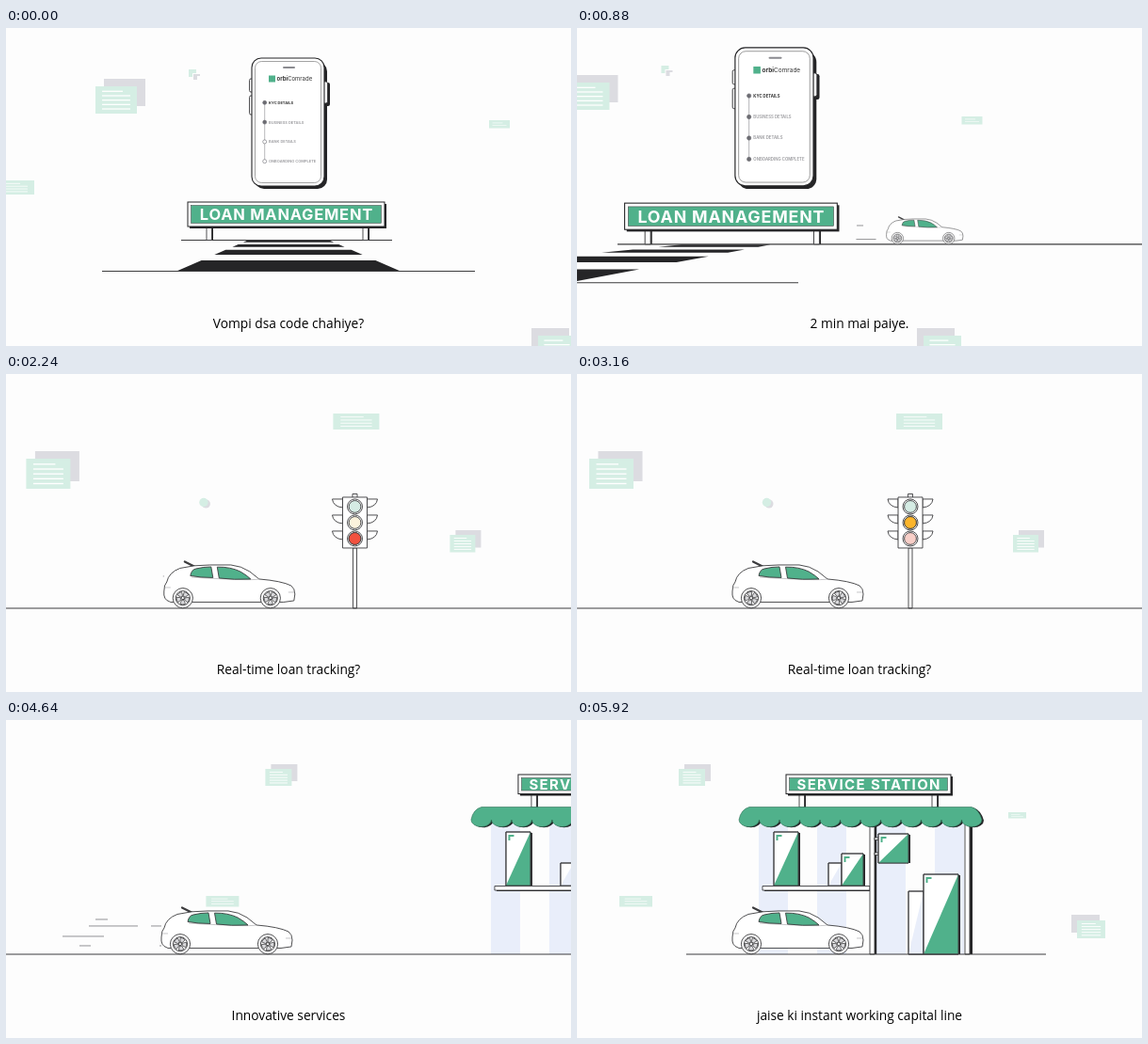
Write an HTML page that moves like this. It is 600 px wide and 338 px high and loops after 5.96 s.

```html
<!DOCTYPE html>
<html lang="en">
<head>
<meta charset="utf-8">
<title>Loan journey</title>
<style>
  html, body { margin: 0; width: 100%; height: 100%; overflow: hidden; background: #fdfdfd; }
  svg { display: block; width: 600px; height: 338px; }
  .ink { stroke: #3c3c3e; stroke-width: .9; stroke-linejoin: round; }
  .sign { font: 700 16.5px Inter, sans-serif; fill: #fff; text-anchor: middle; }
  .tiny { font: 600 4px Inter, sans-serif; fill: #98989c; }
  .brand { font: 400 6px Inter, sans-serif; fill: #333; }
  #caption { font: 400 13.75px "Open Sans", "Noto Sans", sans-serif; text-anchor: middle; }
</style>
</head>
<body>
<svg id="stage" viewBox="0 0 600 338"></svg>
<script>
const LOOP = 5960, STEP = 40, PAN = 1290;
const GREEN = '#50b18b', MINT = '#d5eee4', GREY = '#dcdce1', LILAC = '#e9eefa', DARK = '#252527';

// Shape helpers
const rect = (x, y, w, h, fill, more = '') =>
  `<rect x="${x}" y="${y}" width="${w}" height="${h}" fill="${fill}" ${more}/>`;
const path = (d, fill, more = '') => `<path d="${d}" fill="${fill}" ${more}/>`;
const circle = (x, y, r, fill, more = '') =>
  `<circle cx="${x}" cy="${y}" r="${r}" fill="${fill}" ${more}/>`;
const group = (id, body) => `<g id="${id}">${body}</g>`;
const INK = 'class="ink"';

// Floating document cards
function card(x, y, w, h, rows = 5) {
  let out = rect(x, y, w, h, MINT);
  for (let i = 0; i < rows; i++) {
    const len = w * (i ? .68 : .5);
    out += rect(x + w * .16, y + h * (i + 1) / (rows + 1.2), len, h * .035 + .25, '#fff');
  }
  return out;
}
const pair = (x, y, w, h, dx, dy) => rect(x + dx, y + dy, w, h, GREY) + card(x, y, w, h);

const docsA =
  pair(95, 62, 44, 29, 9, -8) +
  path('M194 44h8v4h-4v4h-4z', MINT) + path('M199 49h7v2h-3v4h-4z', GREY) +
  card(513, 98, 22, 8.5, 2) + card(-14, 162, 44, 15, 4);
const docsB =
  pair(13, 90, 47, 32, 9.5, -8) + card(339, 42, 49, 17, 4) +
  circle(204, 138, 4.5, GREY) + circle(201.5, 136.5, 4.7, MINT) +
  pair(463, 171, 27, 18.5, 6, -5);
const docsC =
  pair(108, 52, 28, 18, 6, -5) + card(458, 98, 19, 6.5, 2) +
  card(45, 187, 35, 11.5, 3) + pair(531, 213, 30, 19, -6, -6);

function phone() {
  const labels = ['KYC DETAILS', 'BUSINESS DETAILS', 'BANK DETAILS', 'ONBOARDING COMPLETE'];
  let out = rect(264, 36, 77, 135, DARK, 'rx="10"') +
    rect(337, 58, 7, 25, DARK, 'rx="2"') +
    rect(336, 57, 5.5, 23, '#fff', INK + ' rx="2"') +
    rect(258.5, 54, 5, 14, '#fff', INK + ' rx="1.5"') +
    rect(258.5, 72, 5, 20, '#fff', INK + ' rx="1.5"') +
    rect(261, 32, 77, 136, '#fff', `rx="10" stroke="${DARK}" stroke-width="1.1"`) +
    rect(264.5, 35.5, 70, 129, '#fff', 'rx="7" stroke="#666" stroke-width=".6"') +
    rect(294, 41, 13, 2, '#8b8b90', 'rx="1"') +
    rect(279, 50.5, 7, 7, GREEN) +
    '<text class="brand" x="287.5" y="56"><tspan font-weight="700">orbi</tspan>Comrade</text>' +
    path('M274.7 79V141.5', 'none', 'stroke="#8b8b90" stroke-width=".6"');
  labels.forEach((label, i) => {
    const y = 79.3 + i * 20.8;
    out += circle(274.7, y, 2, i < 2 ? '#6c6c72' : '#fff', `id="dot${i}" stroke="#6c6c72" stroke-width=".6"`) +
      `<text class="tiny" x="279" y="${y + 1.4}" ${i ? '' : 'style="fill:#333;font-weight:700"'}>${label}</text>`;
  });
  return out;
}

function board(x, y, w, h, label, size, gap) {
  return rect(x + 2, y + 2, w, h, DARK) +
    rect(x, y, w, h, '#fff', `stroke="${DARK}"`) +
    rect(x + 3.5, y + 3.5, w - 7, h - 7, GREEN, 'stroke="#3c3c3e" stroke-width=".5"') +
    `<text class="sign" x="${x + w / 2 + gap / 2}" y="${y + h / 2 + size * .363}" ` +
    `style="font-size:${size}px;letter-spacing:${gap}px">${label}</text>`;
}
const leg = (x, y, h) => rect(x + 2, y, 5, h, DARK) + rect(x, y, 5.5, h, '#fff', INK);

const loanSign = leg(213, 211, 14.5) + leg(379, 211, 14.5) +
  board(193, 185, 209, 26, 'LOAN MANAGEMENT', 16.5, .75);

function trafficLight() {
  let out = rect(-2, -64, 4, 64, '#fff', INK) + rect(-2.5, -121.5, 5, 4, '#fff', INK);
  for (const y of [-116, -99, -82])
    for (const s of [-1, 1])
      out += path(`M${13 * s} ${y}H${24 * s}Q${23 * s} ${y + 8} ${13 * s} ${y + 9}z`, '#fff', INK);
  out += rect(-13, -118, 26, 54, '#fff', INK);
  [['#d5ece4', GREEN], ['#fcf3dc', '#fbb52c'], ['#f8cfc8', '#f2513f']].forEach(([dim, lit], i) => {
    const y = -108 + i * 17;
    out += circle(0, y, 8, '#fff', INK) + circle(0, y, 6.4, dim, INK) +
      circle(0, y, 6.4, lit, `${INK} id="lamp${i}"`);
  });
  return out;
}

function wheel(x, id) {
  let spokes = '';
  for (let i = 0; i < 5; i++)
    spokes += path('M-1.2 -2.2L-2.8 -6.2A6.8 6.8 0 0 1 2.8 -6.2L1.2 -2.2z', '#d9d9dc',
      `transform="rotate(${i * 72})" stroke="#3c3c3e" stroke-width=".7"`);
  return `<g transform="translate(${x} -10.8)">` + circle(0, 0, 10.6, '#fff', INK) +
    circle(0, 0, 7.6, '#fff', INK) + group(id, spokes + circle(0, 0, 1.6, '#fff', INK)) + '</g>';
}
const car =
  path('M-47 -49.5L-37 -44.5', 'none', 'stroke="#3c3c3e" stroke-width="2.2" stroke-linecap="round"') +
  path('M-63 -7Q-70 -9 -69 -18Q-69 -25 -66 -28Q-64 -38 -52 -42.5Q-38 -46 -20 -46H2' +
    'Q13 -45 22 -39L32 -31Q56 -29 66 -24Q70 -21 70 -15L69 -8L58 -6.5H-62z', '#fff', INK) +
  path('M32 -31Q24 -29 -40 -33M-69 -22H-62M70 -17H63', 'none', 'stroke="#8d8d90" stroke-width=".5"') +
  path('M-41 -34.5Q-40 -41 -35 -42Q-27 -44 -19 -44L-17 -32.5Q-30 -32.5 -41 -34.5z', GREEN, INK) +
  path('M-12.5 -43.8Q2 -44 12 -39Q19 -35 23 -31Q5 -30 -10.5 -32z', GREEN, INK) +
  wheel(-49, 'wheelL') + wheel(44, 'wheelR');

// Box with a diagonal two-tone front
function pack(x, y, w, h, tone, shadow = 2) {
  return (shadow ? rect(x + shadow, y + 1, w, h - 1, DARK) : '') +
    rect(x, y, w, h, '#fff', INK) +
    path(`M${x + w} ${y}V${y + h}H${x}z`, tone) +
    (shadow ? path(`M${x + 2.5} ${y + 3}h6v2h-4v4h-2z`, GREEN) : '') +
    rect(x, y, w, h, 'none', INK);
}

function station() {
  let out = '';
  for (const x of [193, 255, 318, 380]) out += rect(x, 104, 31, 145, LILAC);
  out += pack(209, 119, 26, 57, GREEN) + pack(267, 152, 14, 24, LILAC, 0) + pack(281, 142, 23, 34, GREEN) +
    rect(199, 178, 112, 4, DARK) + rect(197, 176.5, 114, 4.5, '#fff', INK) +
    rect(315, 104, 3.2, 145, DARK) + rect(311, 104, 5, 145, '#fff', INK) +
    rect(416, 104, 4, 145, DARK) + rect(412, 104, 5, 145, '#fff', INK) +
    rect(316, 125, 5, 2.5, '#fff', INK) + rect(316, 141, 5, 2.5, '#fff', INK) +
    pack(320, 121, 32, 31, GREEN) +
    pack(352, 182, 16, 67, LILAC, 0) + pack(368, 164, 37, 85, GREEN) +
    leg(236, 79, 14) + leg(377, 79, 14);
  let edge = 'M183 92.5H419Q427 95 430 106';
  for (let i = 0; i < 12; i++) edge += 'a10.75 7.5 0 0 1 -21.5 0';
  edge += 'Q174 95 183 92.5z';
  return out + path(edge, DARK, 'transform="translate(2 .8)"') +
    path(edge, GREEN, 'stroke="#2f6f57" stroke-width=".6"') +
    board(222, 58, 175, 20.5, 'SERVICE STATION', 15, 1.35);
}

document.getElementById('stage').innerHTML =
  group('docsA', docsA) + group('docsLow', pair(565, 327, 40, 28, -7, -8)) +
  group('docsNear', rect(-233, 316, 48, 30, MINT)) +
  group('docsB', docsB) + group('docsC', docsC) +
  path('', DARK, 'id="zebra"') +
  group('phone', phone()) + group('station', station()) + group('light', trafficLight()) +
  path('', 'none', 'id="ground" stroke="#3c3c3e" stroke-width="1.1"') +
  group('loanSign', loanSign) +
  path('', 'none', 'id="streaks" stroke="#77777a" stroke-width=".8"') +
  group('car', car) + '<text id="caption" x="300" y="318.5"></text>';

const el = {};
document.querySelectorAll('[id]').forEach(n => el[n.id] = n);

// Smooth monotone curve through [time, value] points, flat at both ends
function track(...k) {
  const d = k.slice(1).map((p, i) => (p[1] - k[i][1]) / (p[0] - k[i][0]));
  const m = k.map((_, i) => {
    const a = d[i - 1] || 0, b = d[i] || 0;
    return a * b > 0 ? 2 * a * b / (a + b) : 0;
  });
  return t => {
    if (t <= k[0][0]) return k[0][1];
    const i = k.findIndex(p => p[0] >= t) - 1;
    if (i < 0) return k[k.length - 1][1];
    const h = k[i + 1][0] - k[i][0], u = (t - k[i][0]) / h, v = 1 - u;
    return v * v * (1 + 2 * u) * k[i][1] + u * u * (3 - 2 * u) * k[i + 1][1] +
      h * u * v * (v * m[i] - u * m[i + 1]);
  };
}
const ease = (t, a, b) => {
  const u = Math.min(1, Math.max(0, (t - a) / (b - a)));
  return u < .5 ? 2 * u * u : 1 - 2 * (1 - u) ** 2;
};

const panA = track([300, 0], [600, 35], [880, 134], [1240, 560], [1680, 1070], [2080, 1250], [2480, PAN]);
const panB = track([3460, 0], [3800, 32], [4120, 162], [4360, 480], [4560, 850],
  [4780, 1130], [5000, 1260], [5240, 1284], [5560, PAN]);
const carX = track([300, 690], [880, 369], [1680, 272.5], [2400, 234]);
const lineGrow = track([280, 410], [560, 600]);
const lineL = track([5020, 0], [5440, 72], [5800, 116]);
const lineR = track([5020, 600], [5440, 509], [5800, 498]);

const captions = [[0, 'Vompi dsa code chahiye?'], [640, '2 min mai paiye.'], [2080, 'Real-time loan tracking?'],
  [3400, 'Bilkul.'], [4520, 'Innovative services'], [5560, 'jaise ki instant working capital line']];

// Speed lines: [distance behind the car at the given time, height, length]
const runs = [
  { on: 640, off: 2280, at: 1680, rows: [[81, 34, 10], [34, 34, 12], [67, 18, 53], [75, 9, 25], [35, 9, 36]] },
  { on: 3920, off: 5360, at: 5000, rows: [[101, 30, 11], [50, 37, 13], [85, 19, 44], [57, 30, 52], [92, 9, 19], [67, 9, 12]] }
];
function streaks(t, left, floor, k) {
  const run = runs.find(r => t >= r.on && t < r.off);
  if (!run) return '';
  return run.rows.map(([gap, up, len]) => {
    const far = (((gap + (t - run.at) * .25) % 110) + 110) % 110;
    if (far > (t - run.on) * .25 || far > (run.off - t) * .5) return '';
    return `M${left - far * k} ${floor - up * k}h${Math.min(len, far) * k}`;
  }).join('');
}

function zebra(p, y) {
  const side = (dy, s) => {
    const v = dy * (1 + .24 * p);
    return `${300 - 139 * p - 7.6 * p * v + s * (43 + 3.5 * p + 2.3 * v)} ${y + v}`;
  };
  return [[.3, 2.3], [4.5, 7.2], [10.3, 15.5], [21.5, 33]].map(([a, b]) =>
    `M${side(a, -1)}L${side(a, 1)}L${side(b, 1)}L${side(b, -1)}z`).join('');
}

const place = (name, v) => el[name].setAttribute('transform', v);
const show = (name, on) => el[name].setAttribute('display', on ? 'inline' : 'none');

function draw(t) {
  const a = panA(t), b = panB(t), p = a / 134;
  const k = .49 + .51 * ease(t, 300, 2200);
  const floor = 225.5 + (k - .49) * 46;
  const grow = 1 + .08 * p, first = a < 700;

  // Opening scene
  show('phone', first);
  show('loanSign', first);
  place('phone', `translate(${300 - 90 * p ** 1.2} 170) scale(${grow}) translate(-300 -170)`);
  place('loanSign', `translate(${298 - a} ${floor}) scale(${grow}) translate(-298 -225.5)`);
  el.zebra.setAttribute('d', first ? zebra(p, floor) : '');
  el.dot2.setAttribute('fill', t < 200 ? '#fff' : '#6c6c72');
  el.dot3.setAttribute('fill', t < 480 ? '#fff' : '#6c6c72');

  // Cards drift at their own depth
  place('docsA', `translate(${-.78 * a} ${-4 * Math.min(p, 2)})`);
  place('docsLow', `translate(${-1.47 * a} 0)`);
  place('docsNear', `translate(${PAN - a} 0)`);
  place('docsB', `translate(${.51 * (PAN - a) - .7 * b} 0)`);
  place('docsC', `translate(${.52 * (PAN - b)} 0)`);
  show('docsC', b > 0);

  // Road
  const start = first ? 298 - a - 112 * grow : lineL(t);
  const end = t < 1000 ? lineGrow(t) : lineR(t);
  let road = `M${Math.max(0, start)} ${floor}H${end}`;
  if (first) road += `M${102 - 400 * p} ${floor + 33 * (1 + .24 * p)}H${498 - 263 * p}`;
  el.ground.setAttribute('d', road);

  // Traffic light
  place('light', `translate(${354 + PAN - a - b} ${floor}) scale(${k})`);
  const amber = ease(t, 2720, 2840), go = ease(t, 3360, 3480);
  [go, amber * (1 - go), 1 - amber].forEach((o, i) => el['lamp' + i].setAttribute('opacity', o));

  // Service station
  show('station', b > 600);
  place('station', `translate(${PAN - b} 0)`);

  // Car
  const x = carX(t), turn = (a + b) * 5.4 % 360;
  place('car', `translate(${x} ${floor}) scale(${k})`);
  place('wheelL', `rotate(${turn})`);
  place('wheelR', `rotate(${turn})`);
  el.streaks.setAttribute('d', streaks(t, x - 69 * k, floor, k));

  const text = captions.filter(c => c[0] <= t).pop()[1];
  if (el.caption.textContent !== text) el.caption.textContent = text;
}

const begin = performance.now();
function tick() {
  const t = (performance.now() - begin) % LOOP;
  draw(Math.floor(t / STEP) * STEP);
  requestAnimationFrame(tick);
}
tick();
</script>
</body>
</html>
```
